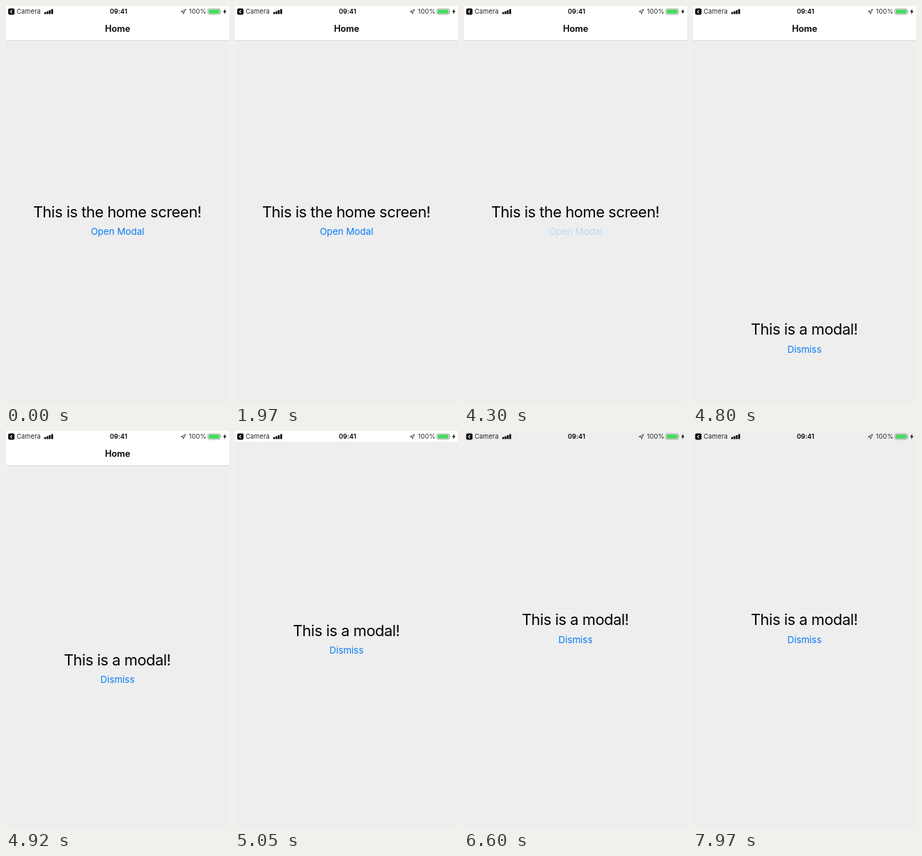
An HTML page for the animation above (8 s loop, 320 px wide and 569 px high).

```html
<!DOCTYPE html>
<html lang="en">
<head>
<meta charset="utf-8">
<title>Modal demo</title>
<style>
  html, body { margin: 0; height: 100%; overflow: hidden; background: #eee; }
  svg { display: block; width: 100%; height: 100%; }
  text {
    font-family: Inter, "Liberation Sans", sans-serif;
    font-optical-sizing: none;
    text-anchor: middle;
  }
  .head { font-size: 21.8px; letter-spacing: -.02em; }
  .link { font-size: 13.35px; fill: #067cf6; }
  .title { font-size: 12.8px; font-weight: 600; }
  .status { font-size: 9.2px; fill: #222; letter-spacing: .1px; }
</style>
</head>
<body>
<svg viewBox="0 0 320 569">
  <g id="home">
    <rect width="320" height="569" fill="#eee"/>
    <rect width="320" height="49.5" fill="#fff"/>
    <rect y="49.3" width="320" height=".4" fill="#aaa"/>
    <text class="title" x="160.1" y="37.3">Home</text>
    <text class="head" x="159.7" y="303.1">This is the home screen!</text>
    <text class="link" id="open" x="160" y="328.2">Open Modal</text>
  </g>

  <g id="modal">
    <rect width="320" height="569" fill="#eee"/>
    <text class="head" x="159.7" y="278.4">This is a modal!</text>
    <text class="link" x="160" y="303.6">Dismiss</text>
  </g>

  <g id="statusbar">
    <rect x="3.2" y="3.6" width="9" height="9" rx="2"/>
    <path d="M8.8 5.9 6.4 8.1l2.4 2.2" fill="none" stroke="#fff" stroke-width="1.1"/>
    <text class="status" x="32.5" y="11.4">Camera</text>
    <path d="M55 11.5v-2.8h2.5v2.8zM58.3 11.5V7.4h2.5v4.1zM61.6 11.5V6h2.5v5.5zM65 11.5V4.4h2.5v7.1z"/>
    <text class="status" x="161.5" y="11.4" style="font-weight:600;fill:#000">09:41</text>
    <path d="M251.2 8.2 257.8 4.8 254.6 11.4 254.3 8.5Z" fill="none" stroke="#222" stroke-width=".8" stroke-linejoin="round"/>
    <text class="status" x="275.1" y="11.4" style="letter-spacing:.2px">100%</text>
    <rect x="289.6" y="3.9" width="18" height="8.2" rx="2" fill="none" stroke="#888" stroke-width=".7"/>
    <rect x="290.7" y="5" width="15.8" height="6" rx="1.1" fill="#4cd964"/>
    <path d="M308.5 6.7q1.3 1.3 0 2.6z" fill="#888"/>
    <path d="M314.9 3.8 311.6 8.6H313.7L312.9 12 316.3 7.2H314.1Z"/>
  </g>
</svg>
<script>
  const LOOP = 8000, HEIGHT = 569, PRESS = 4150, OPEN = 4694, SETTLED = 5470;
  const openLink = document.getElementById("open");
  const modal = document.getElementById("modal");

  const easeInOut = x => x < .5 ? 2 * x * x : 1 - 2 * (1 - x) ** 2;
  const ramp = (t, start, length) =>
    easeInOut(Math.min(1, Math.max(0, (t - start) / length)));

  function modalTop(t) {
    if (t < OPEN) return HEIGHT;
    return t < SETTLED ? HEIGHT * Math.exp(-.0101 * (t - OPEN)) : 0;
  }

  function draw(t) {
    openLink.setAttribute("opacity", 1 - .8 * (ramp(t, PRESS, 150) - ramp(t, OPEN, 250)));
    modal.setAttribute("transform", `translate(0 ${modalTop(t)})`);
  }

  function tick() {
    draw(performance.now() % LOOP);
    requestAnimationFrame(tick);
  }
  tick();
</script>
</body>
</html>
```
